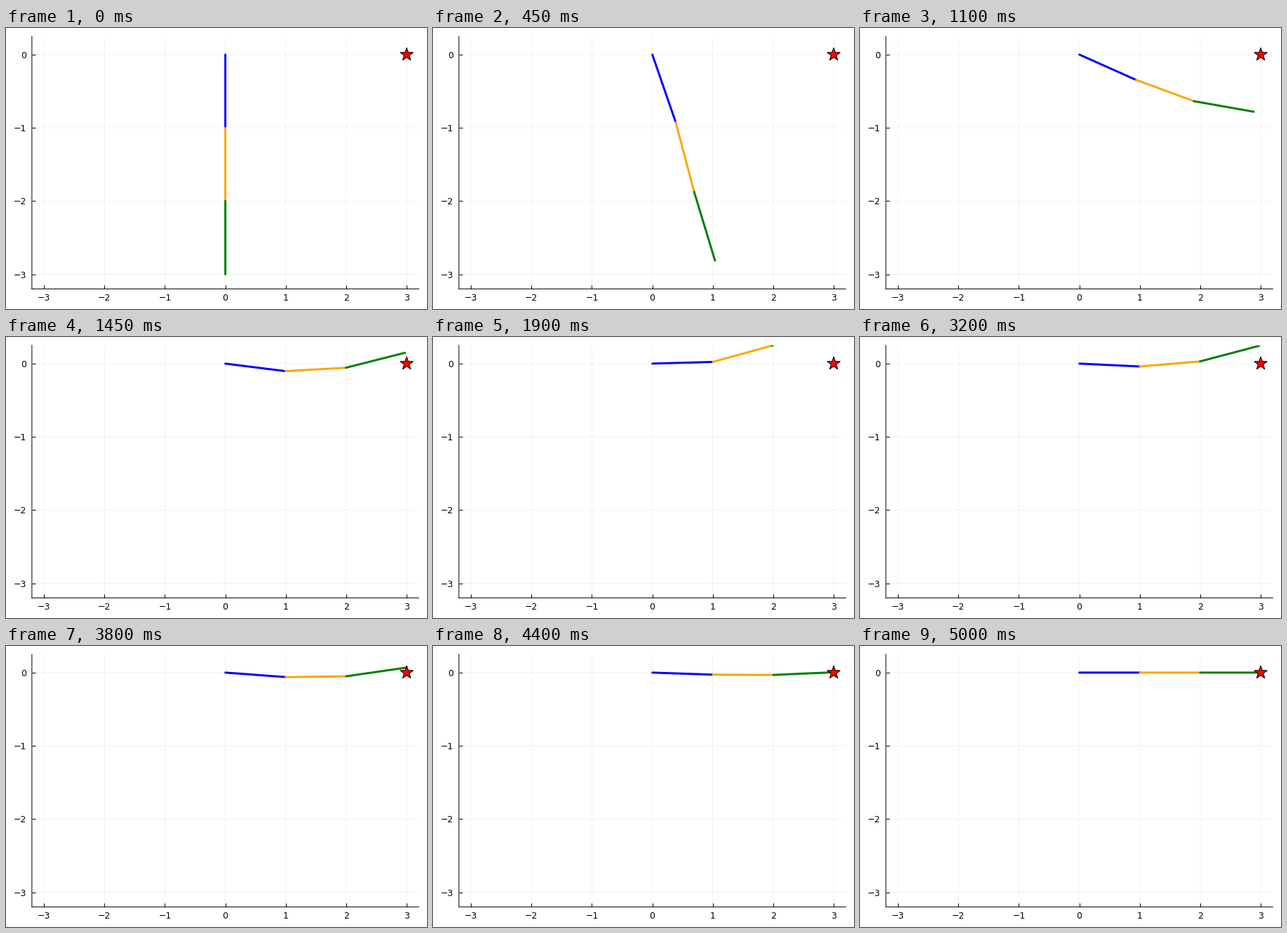
A matplotlib script that plays this animation: 600 by 400 pixels, repeating every 5.05 s.

```python
import numpy as np
import matplotlib.pyplot as plt
from matplotlib.animation import FuncAnimation
from matplotlib.patches import Polygon

W, H, DPI = 600, 400, 100
FRAMES, STEP_MS = 101, 50
PX = 72 / DPI  # points per pixel

# Key poses: time in seconds, then the absolute angle of each link in degrees
POSES = np.array([
    (0.00, -90.0, -90.0, -90.0),
    (0.45, -67.3, -72.2, -69.8),
    (1.10, -20.2, -16.9, -8.3),
    (1.90, 1.3, 12.8, 21.0),
    (2.60, 0.7, 9.5, 18.0),
    (3.80, -3.5, 0.6, 6.8),
    (5.00, 0.0, 0.0, 0.0),
])


def smooth_path(t, y, x):
    """Cubic spline through the poses, at rest at both ends."""
    h, n = np.diff(t), len(t)
    d = np.diff(y, axis=0) / h[:, None]
    a, b = np.eye(n), np.zeros_like(y)
    for i in range(1, n - 1):
        a[i, i - 1:i + 2] = h[i], 2 * (h[i - 1] + h[i]), h[i - 1]
        b[i] = 3 * (h[i] * d[i - 1] + h[i - 1] * d[i])
    m = np.linalg.solve(a, b)

    i = np.clip(np.searchsorted(t, x, side="right") - 1, 0, n - 2)
    k = h[i][:, None]
    s = (x - t[i])[:, None] / k
    return ((1 + 2 * s) * (1 - s) ** 2 * y[i] + s * (1 - s) ** 2 * k * m[i]
            + s * s * (3 - 2 * s) * y[i + 1] + s * s * (s - 1) * k * m[i + 1])


def joints(steps):
    """Joint coordinates per frame, starting at the fixed base."""
    return np.pad(np.cumsum(steps, axis=1), ((0, 0), (1, 0)))


times = np.arange(FRAMES) * STEP_MS / 1000
theta = np.radians(smooth_path(POSES[:, 0], POSES[:, 1:], times))
joint_x, joint_y = joints(np.cos(theta)), joints(np.sin(theta))

fig = plt.figure(figsize=(W / DPI, H / DPI), dpi=DPI, facecolor="white")
left, right, top, bottom = 36.9, 588.3, 11.8, 371.4
ax = fig.add_axes([left / W, 1 - bottom / H, (right - left) / W, (bottom - top) / H])
ax.set_xlim(-3.2, 3.2)
ax.set_ylim(-3.2, 0.25)
ax.set_xticks(range(-3, 4))
ax.set_yticks(range(-3, 1))
ax.set_axisbelow(True)
ax.grid(color="black", alpha=0.1, linewidth=0.5 * PX, snap=False)
ax.tick_params(direction="in", length=5 * PX, width=PX, labelsize=9,
               labelfontfamily="DejaVu Sans")
ax.tick_params(axis="x", pad=6.5 * PX)
ax.tick_params(axis="y", pad=8 * PX)
for side, spine in ax.spines.items():
    spine.set(visible=side in ("left", "bottom"), linewidth=PX, snap=False)

links = [ax.plot([], [], color=c, linewidth=3 * PX, solid_capstyle="round",
                 snap=False, zorder=3)[0] for c in ("blue", "orange", "green")]

# Five-pointed star at the goal, sized in pixels
turn = np.radians(90 + 36 * np.arange(10))
radius = 9.75 * np.where(np.arange(10) % 2, 0.4, 1)
star_x = 3 + radius * np.cos(turn) * 6.4 / (right - left)
star_y = radius * np.sin(turn) * 3.45 / (bottom - top)
ax.add_patch(Polygon(np.column_stack([star_x, star_y]), facecolor="red",
                     edgecolor="black", linewidth=PX, joinstyle="round",
                     snap=False, zorder=5))


def draw(i):
    for k, link in enumerate(links):
        link.set_data(joint_x[i, k:k + 2], joint_y[i, k:k + 2])
    return links


anim = FuncAnimation(fig, draw, frames=FRAMES, interval=STEP_MS,
                     repeat=True, repeat_delay=0, blit=False)
plt.show()
```
